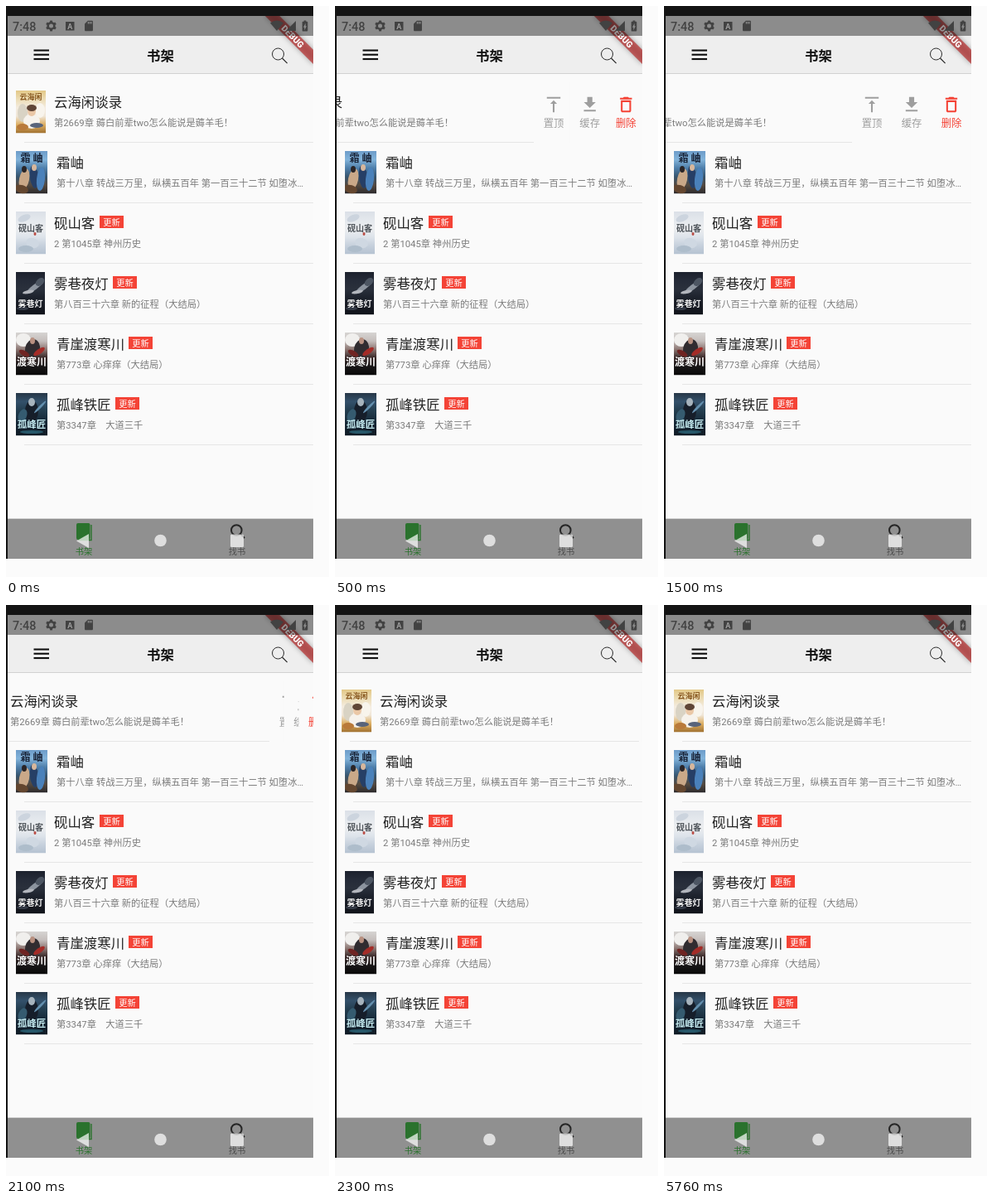
An HTML page with a canvas that plays this animation: 390 px wide and 689 px high, repeating every 8 s.

```html
<!DOCTYPE html>
<html lang="zh-CN">
<head>
<meta charset="utf-8">
<title>书架</title>
<style>
html, body { margin: 0; width: 100%; height: 100%; overflow: hidden; background: #fbfbfb; }
canvas { display: block; width: 390px; height: 689px; }
</style>
</head>
<body>
<canvas id="stage"></canvas>
<script>
const canvas = document.getElementById('stage');
const ctx = canvas.getContext('2d');
const ratio = window.devicePixelRatio || 1;
canvas.width = 390 * ratio;
canvas.height = 689 * ratio;

const LOOP = 8000;
const UNIT = 1.027;
const LEFT = 2, RIGHT = 371;
const ROW_TOP = 92, ROW_HEIGHT = 73;
const PAGE = '#fafafa', BAR = '#eeeeee', RED = '#f44336', GREY = '#9e9e9e', GREEN = '#2a722d', DIM = '#424242';
const FONT = 'Roboto, "Noto Sans CJK SC", "Noto Sans CJK", sans-serif';

// [start time, distance the first row is dragged left]
const SLIDES = [[0, 0], [500, 131], [600, 144], [2100, 53], [2200, 20], [2300, 4], [2400, 0]];

const ACTIONS = [
  { label: '置顶', color: GREY, icon: 'M8 11h3v10h2V11h3l-4-4-4 4zM4 3v2h16V3H4z' },
  { label: '缓存', color: GREY, icon: 'M19 9h-4V3H9v6H5l7 7 7-7zM5 18v2h14v-2H5z' },
  { label: '删除', color: RED, icon: 'M6 19c0 1.1.9 2 2 2h8c1.1 0 2-.9 2-2V7H6v12zM8 9h8v10H8V9zm7.5-5l-1-1h-5l-1 1H5v2h14V4z' }
];

// cover: vertical gradient, ellipses [x, y, rx, ry, angle, color], lettering
const BOOKS = [
  { title: '云海闲谈录', note: '第2669章 薅白前辈two怎么能说是薅羊毛！', width: 36, textX: 58,
    sky: ['#e3c887', '#ecdcb4', '#f4ecdf', '#f0e6d8', '#dcae62', '#a0702f'],
    shapes: [[8, 27, 6, 11, 0, '#d9d3c4'], [29, 24, 6, 9, 0, '#f8f4ec'], [19, 37, 10, 9, 0, '#f6f2ec'],
      [19, 25, 5, 6, 0, '#eac7a6'], [19, 21, 6, 4, 0, '#5f4536'], [25, 42, 8, 3, 0, '#59647a'],
      [8, 44, 7, 4, 0, '#b97a3a']],
    mark: ['云海闲', 18, 8, 9, '#8a5a22'] },
  { title: '霜岫', note: '第十八章 转战三万里，纵横五百年 第一百三十二节 如堕冰…', width: 38, textX: 61,
    sky: ['#6d9cc9', '#82b3da', '#4f7faa', '#38566f', '#54493f', '#2b2a2d'],
    shapes: [[10, 34, 6, 13, .2, '#c9a888'], [22, 31, 5, 14, -.1, '#263f66'], [30, 34, 5, 14, .1, '#4a81ba'],
      [10, 22, 3, 4, 0, '#2a2527'], [22, 20, 3, 4, 0, '#d6b79d'], [7, 46, 8, 5, .3, '#63462f']],
    mark: ['霜 岫', 19, 9, 12, '#182236'] },
  { title: '砚山客', note: '2 第1045章 神州历史', width: 36, textX: 58, badge: true,
    sky: ['#dbe0e7', '#e4e8ed', '#eceef0', '#dde3ea', '#c6d0dc', '#b5c2d1'],
    shapes: [[10, 8, 8, 4, -.4, '#ccd4de'], [20, 38, 8, 6, .3, '#cfd8e2'], [12, 45, 9, 4, 0, '#aebdcb'],
      [23, 27, 1.5, 2, 0, '#b94b43']],
    mark: ['砚山客', 18, 20, 10, '#4d5359'] },
  { title: '雾巷夜灯', note: '第八百三十六章 新的征程（大结局）', width: 35, textX: 58, badge: true,
    sky: ['#1c212d', '#252b38', '#2a303c', '#1d222c', '#171a22', '#10131a'],
    shapes: [[23, 18, 13, 3, -.65, '#8c949f'], [15, 24, 7, 2, -.2, '#b3b6bd'], [29, 12, 6, 4, -.7, '#4d5663'],
      [8, 44, 7, 2, 0, '#343a46']],
    mark: ['雾巷灯', 17.5, 38, 10, '#f1f1f1'] },
  { title: '青崖渡寒川', note: '第773章 心痒痒（大结局）', width: 38, textX: 61, badge: true,
    sky: ['#d6d4d2', '#c5bebc', '#8a7470', '#352525', '#171516', '#090909'],
    shapes: [[9, 9, 9, 8, 0, '#f0efed'], [20, 20, 9, 12, .2, '#302c30'], [20, 10, 3, 4, 0, '#b89080'],
      [28, 23, 8, 3, -.6, '#a42c27'], [10, 25, 7, 3, .5, '#6f2422']],
    mark: ['渡寒川', 19, 36, 12, '#ffffff'] },
  { title: '孤峰铁匠', note: '第3347章　大道三千', width: 38, textX: 61, badge: true,
    sky: ['#273747', '#33506a', '#243f51', '#192d3d', '#13212e', '#101b25'],
    shapes: [[19, 22, 8, 13, 0, '#161e2a'], [19, 11, 4, 5, 0, '#a6b3bd'], [29, 17, 10, 1.5, -.8, '#638fae'],
      [8, 27, 5, 8, .4, '#355b70'], [19, 47, 14, 2, 0, '#27586a']],
    mark: ['孤峰匠', 19, 38, 11.5, '#c9eff4'] }
];

function rect(x, y, w, h, color) {
  ctx.fillStyle = color;
  ctx.fillRect(x, y, w, h);
}

function text(str, x, middle, size, color, align = 'left', weight = 400) {
  ctx.font = `${weight} ${size}px ${FONT}`;
  ctx.textAlign = align;
  ctx.fillStyle = color;
  ctx.fillText(str, x, middle + size * .37);
}

function ellipse(x, y, rx, ry, color, angle = 0) {
  ctx.fillStyle = color;
  ctx.beginPath();
  ctx.ellipse(x, y, rx, ry, angle, 0, Math.PI * 2);
  ctx.fill();
}

function ring(x, y, radius, width, color) {
  ctx.lineWidth = width;
  ctx.strokeStyle = color;
  ctx.beginPath();
  ctx.arc(x, y, radius, 0, Math.PI * 2);
  ctx.stroke();
}

function roundRect(x, y, w, h, radius, color) {
  ctx.fillStyle = color;
  ctx.beginPath();
  ctx.roundRect(x, y, w, h, radius);
  ctx.fill();
}

function polygon(points, color) {
  ctx.fillStyle = color;
  ctx.beginPath();
  points.forEach(([x, y]) => ctx.lineTo(x, y));
  ctx.fill();
}

function stroke(path, width, color) {
  ctx.lineWidth = width;
  ctx.strokeStyle = color;
  ctx.stroke(new Path2D(path));
}

// draws a path on a 24-unit grid around a centre
function icon(path, x, y, scale, color) {
  ctx.save();
  ctx.translate(x, y);
  ctx.scale(scale, scale);
  ctx.translate(-12, -12);
  ctx.fillStyle = color;
  ctx.fill(new Path2D(path), 'evenodd');
  ctx.restore();
}

function clipped(x, y, w, h, draw) {
  ctx.save();
  ctx.beginPath();
  ctx.rect(x, y, w, h);
  ctx.clip();
  draw();
  ctx.restore();
}

function drawCover(book, x, y) {
  const height = 51.5;
  clipped(x, y, book.width, height, () => {
    ctx.translate(x, y);
    const sky = ctx.createLinearGradient(0, 0, 0, height);
    book.sky.forEach((color, i) => sky.addColorStop(i / (book.sky.length - 1), color));
    rect(0, 0, book.width, height, sky);
    book.shapes.forEach(([sx, sy, rx, ry, angle, color]) => ellipse(sx, sy, rx, ry, color, angle));
    const [label, mx, my, size, color] = book.mark;
    text(label, mx, my, size, color, 'center', 700);
  });
}

function drawBook(book, top, shift) {
  const titleSize = 16 * UNIT;
  const x = book.textX - shift;
  drawCover(book, 12 - shift, top + 10);
  text(book.title, x, top + 23.7, titleSize, '#212121');
  text(book.note, x, top + 49.3, 11 * UNIT, '#7b7b7b');
  if (book.badge) {
    const badgeX = Math.round(x + book.title.length * titleSize + 5.3);
    rect(badgeX, top + 15, 29, 15, RED);
    text('更新', badgeX + 14.5, top + 23, 10 * UNIT, '#fff', 'center');
  }
  rect(22 - shift, top + 72, RIGHT - 22, 1, '#e6e6e6');
}

function drawActions(shift) {
  ACTIONS.forEach((action, i) => {
    const x = RIGHT - shift + i * shift / ACTIONS.length;
    rect(x, ROW_TOP, 48, ROW_HEIGHT, PAGE);
    icon(action.icon, x + 24, 119, UNIT, action.color);
    text(action.label, x + 24, 141.3, 12 * UNIT, action.color, 'center');
  });
}

function drawAppBar() {
  rect(LEFT, 12, RIGHT - LEFT, 70, BAR);
  rect(LEFT, 81, RIGHT - LEFT, 1, '#d1d1d1');
  [52.5, 57.7, 63].forEach(y => rect(33.5, y, 18.5, 2.1, '#111'));
  text('书架', 186.5, 60.3, 16 * UNIT, '#111', 'center', 700);
  ring(328.5, 58, 7, 1, '#2a2a2a');
  stroke('M333.5 63L339.6 69.2', 1.2, '#2a2a2a');
}

function drawBanner() {
  clipped(LEFT, 12, RIGHT - LEFT, 70, () => {
    ctx.translate(RIGHT, 12);
    ctx.rotate(Math.PI / 4);
    ctx.scale(UNIT, UNIT);
    ctx.shadowColor = 'rgba(0,0,0,.5)';
    ctx.shadowBlur = 6 * ratio;
    rect(-40, 28, 80, 12, 'rgba(183,28,28,.63)');
    ctx.shadowColor = 'transparent';
    text('DEBUG', 0, 34, 10.2, '#fff', 'center', 900);
  });
}

// the system bar is a dark veil over the app
function drawStatusBar() {
  rect(LEFT, 12, RIGHT - LEFT, 24, 'rgba(0,0,0,.41)');
  text('7:48', 8, 24.3, 14 * UNIT, DIM, 'left', 500);

  ring(54.5, 24, 3.8, 2.6, DIM);
  for (let i = 0; i < 6; i++) {
    ctx.save();
    ctx.translate(54.5, 24);
    ctx.rotate(i * Math.PI / 3);
    rect(-1.5, -6.4, 3, 2.6, DIM);
    ctx.restore();
  }

  rect(72, 19, 10.5, 10.5, DIM);
  text('A', 77.2, 24.2, 9, '#a0a0a0', 'center', 700);
  icon('M18 2h-8L4 8v12c0 1.1.9 2 2 2h12c1.1 0 2-.9 2-2V4c0-1.1-.9-2-2-2zm-6 6h-2V4h2v4zm3 0h-2V4h2v4zm3 0h-2V4h2v4z', 100, 24, .62, DIM);

  ctx.fillStyle = DIM;
  ctx.fill(new Path2D('M319 20.5Q327 14.5 335 20.5L327 30Z'));
  polygon([[350, 18], [350, 30], [338, 30]], DIM);
  icon('M15.7 4H14V2h-4v2H8.3C7.6 4 7 4.6 7 5.3v15.3c0 .8.6 1.4 1.3 1.4h7.3c.8 0 1.4-.6 1.4-1.3V5.3C17 4.6 16.4 4 15.7 4zM11 20v-5.5H9L13 7v5.5h2L11 20z', 361, 24, .66, DIM);
}

function drawBottomBar() {
  rect(LEFT, 618, RIGHT - LEFT, 1, '#d3d3d3');
  rect(LEFT, 619, RIGHT - LEFT, 48, '#909090');

  roundRect(85, 624, 16.5, 20, 2, GREEN);
  stroke('M103 626V644.5H87', 1.4, GREEN);
  text('书架', 94, 658.3, 10 * UNIT, GREEN, 'center');

  ring(278.3, 632.5, 6.3, 2, '#252525');
  stroke('M283 637L288 642', 2, '#252525');
  text('找书', 279, 658.3, 10 * UNIT, '#4d4d4d', 'center');

  const key = 'rgba(255,255,255,.7)';
  polygon([[85, 645.5], [100, 637], [100, 654]], key);
  ellipse(186.5, 645, 7.3, 7.3, key);
  roundRect(271, 637.5, 16, 15.5, 1.5, key);
}

function render(now) {
  const time = now % LOOP;
  const shift = SLIDES.filter(([start]) => start <= time).pop()[1];
  ctx.setTransform(ratio, 0, 0, ratio, 0, 0);
  rect(0, 0, 390, 689, '#fbfbfb');
  rect(0, 0, RIGHT, 667, '#141414');
  rect(LEFT, 12, RIGHT - LEFT, 655, PAGE);
  clipped(LEFT, 82, RIGHT - LEFT, 536, () => {
    BOOKS.forEach((book, i) => drawBook(book, ROW_TOP + i * ROW_HEIGHT, i ? 0 : shift));
    if (shift) drawActions(shift);
  });
  drawAppBar();
  drawBanner();
  drawStatusBar();
  drawBottomBar();
  requestAnimationFrame(() => render(performance.now()));
}

render(0);
</script>
</body>
</html>
```
